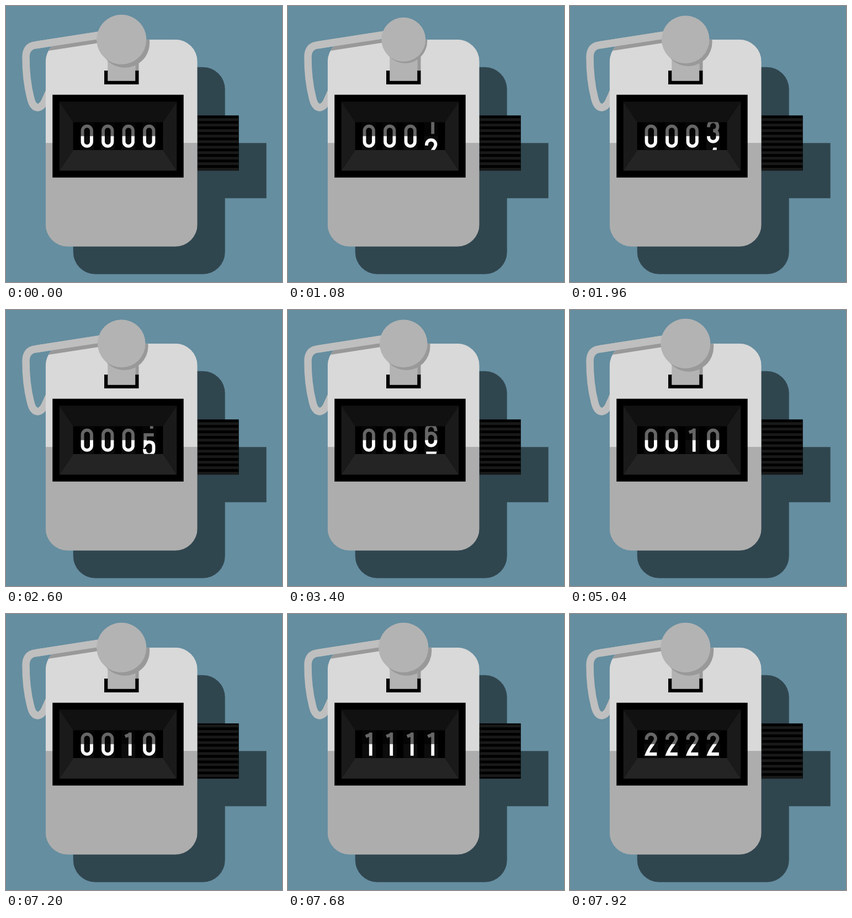
Animation, 500 px wide and 500 px high, one loop 8 s. Source, as an HTML page with a canvas:

```html
<!DOCTYPE html>
<html lang="en">
<head>
<meta charset="utf-8">
<title>Tally counter</title>
<style>
html, body { margin: 0; width: 100%; height: 100%; overflow: hidden; background: #658ea0; }
canvas { display: block; width: 500px; height: 500px; }
</style>
</head>
<body>
<canvas id="stage" width="500" height="500"></canvas>
<script>
const ctx = document.getElementById('stage').getContext('2d');
const LOOP = 8000, STEP = 40, BEAT = 480;
const CLICKS = 10, FIRST_CLICK = 520, FIRST_RESET = 7200;
const PITCH = 50, MID = 236;
const METAL = '#b3b3b3', WIRE = '#bfbfbf', SHADE = '#999';

// Digits as strokes around their own centre
const DIGITS = [
  'M-8.2-10A8.2 8.2 0 0 1 8.2-10V10A8.2 8.2 0 0 1-8.2 10Z',
  'M-6-14L3-17.5M3-21V21',
  'M-8.2-8V-10A8.2 8.2 0 0 1 8.2-10C8.2-3-2 3-7.5 18H10.5',
  'M-8.2-8V-10A8.2 8.2 0 0 1 8.2-10Q8.2-1.5 0-1.5Q8.2-1.5 8.2 6V10A8.2 8.2 0 0 1-8.2 10V8',
  'M6.5-18H2.5L-7.5 10.5H11M4.5-3V21',
  'M8.5-18H-7V-1Q-4-5 0-5Q8.2-5 8.2 3V10A8.2 8.2 0 0 1-8.2 10V8',
  'M8.2-8V-10A8.2 8.2 0 0 0-8.2-10V10A8.2 8.2 0 0 0 8.2 10V4A8.2 8.2 0 0 0-8.2 4',
  'M-9-18H6.5L-3 21',
  'M0-1.5A8 8.2 0 1 1 .01-1.5A8.2 9.7 0 1 1 0-1.5',
  'M-8.2 8V10A8.2 8.2 0 0 0 8.2 10V-10A8.2 8.2 0 0 0-8.2-10V-4A8.2 8.2 0 0 0 8.2-4'
].map(d => new Path2D(d));

const wire = new Path2D('M190 50L53 71.2Q37 73.5 36.3 92Q36 133 45 168Q49 184 58 184.2Q66 183 71 172L80 152');
const wireTop = new Path2D('M190 50L53 71.2');
const body = new Path2D();
body.roundRect(72, 61, 275, 375, 40);

const clamp = v => Math.min(1, Math.max(0, v));
const steps = (t, start) => Math.floor((t - start) / STEP);

function rect(color, x, y, w, h) {
  ctx.fillStyle = color;
  ctx.fillRect(x, y, w, h);
}

function poly(color, ...pts) {
  ctx.fillStyle = color;
  ctx.beginPath();
  for (const [x, y] of pts) ctx.lineTo(x, y);
  ctx.fill();
}

function disc(color, x, y, r) {
  ctx.fillStyle = color;
  ctx.beginPath();
  ctx.arc(x, y, r, 0, Math.PI * 2);
  ctx.fill();
}

function line(path, color, width) {
  ctx.strokeStyle = color;
  ctx.lineWidth = width;
  ctx.stroke(path);
}

function clipped(path, draw) {
  ctx.save();
  ctx.clip(path);
  draw();
  ctx.restore();
}

function drawDial(turn) {
  const gap = 10, shift = (turn * 2 * gap) % gap;
  const area = new Path2D();
  area.rect(347, 198.5, 75, 100);
  rect('#000', 347, 198.5, 75, 100);
  clipped(area, () => {
    for (let y = 203.5 - shift; y < 300; y += gap) rect('#191919', 347, y, 75, gap / 2);
  });
}

function drawBody() {
  clipped(body, () => {
    rect('#d9d9d9', 72, 61, 275, 188);
    rect('#adadad', 72, 248.5, 275, 188);
    ctx.translate(6, 6);
    line(wireTop, SHADE, 13.5);
  });
  line(wireTop, WIRE, 13.5);
}

function drawWheels(wheels) {
  const a = [97, 173.5], b = [309.5, 173.5], c = [309.5, 298.5], d = [97, 298.5];
  const e = [122, 211], f = [284.5, 211], g = [284.5, 261], h = [122, 261];
  rect('#000', 84.5, 161, 237.5, 150);
  poly('#111', a, b, f, e);
  poly('#1a1a1a', b, c, g, f);
  poly('#242424', c, d, h, g);
  poly('#1a1a1a', d, a, e, h);

  const win = new Path2D();
  win.rect(122, 211, 162.5, 50);
  clipped(win, () => {
    rect('#000', 122, 211, 163, 50);
    wheels.forEach((pos, i) => {
      const x = 147 + i * 37.5, n = Math.floor(pos + 1e-6);
      rect('#0c0c0c', x - 12.5, 211, 25, 50);
      for (const k of [n, n + 1]) {
        ctx.save();
        ctx.translate(x, MID + (k - pos) * PITCH);
        line(DIGITS[k % 10], '#fff', 5.8);
        ctx.restore();
      }
    });
    rect('rgba(0,0,0,.6)', 122, 211, 163, MID - 211);
  });
}

function drawButton(press) {
  const x = 209.5, y = 61, r = 45 - 5 * press, drop = 6 - 3 * press;
  rect('#000', 178.25, 117.25, 62.5, 25);
  rect(SHADE, 234.5, 85, 6.25, 32.25);
  rect(METAL, 184.5, 85, 50, 51);
  clipped(body, () => disc(SHADE, x + drop, y + drop, r));
  disc(METAL, x, y, r);
}

function render(t) {
  let count = 0, press = 0;
  for (let i = 0; i < CLICKS; i++) {
    const p = clamp((steps(t, FIRST_CLICK + i * BEAT) + 1) / 6);
    count += p;
    press += 1 - Math.abs(2 * p - 1);
  }
  let reset = 0, turn = 0;
  for (let i = 0; i < 2; i++) {
    const s = steps(t, FIRST_RESET + i * BEAT);
    reset += clamp(s / 6);
    turn += clamp((s + 1) / 7);
  }
  const tens = Math.max(0, count - 9, reset);

  rect('#658ea0', 0, 0, 500, 500);
  ctx.save();
  ctx.translate(-0.25, -0.25);
  ctx.fillStyle = '#30464f';
  ctx.beginPath();
  ctx.roundRect(122, 111, 275, 375, 40);
  ctx.fill();
  rect('#30464f', 390, 248.5, 82, 100);

  drawDial(turn);
  line(wire, WIRE, 13.5);
  drawBody();
  drawWheels([reset, reset, tens, count + reset]);
  drawButton(press);
  ctx.restore();
}

function frame(now) {
  render(now % LOOP);
  requestAnimationFrame(frame);
}
render(0);
requestAnimationFrame(frame);
</script>
</body>
</html>
```
